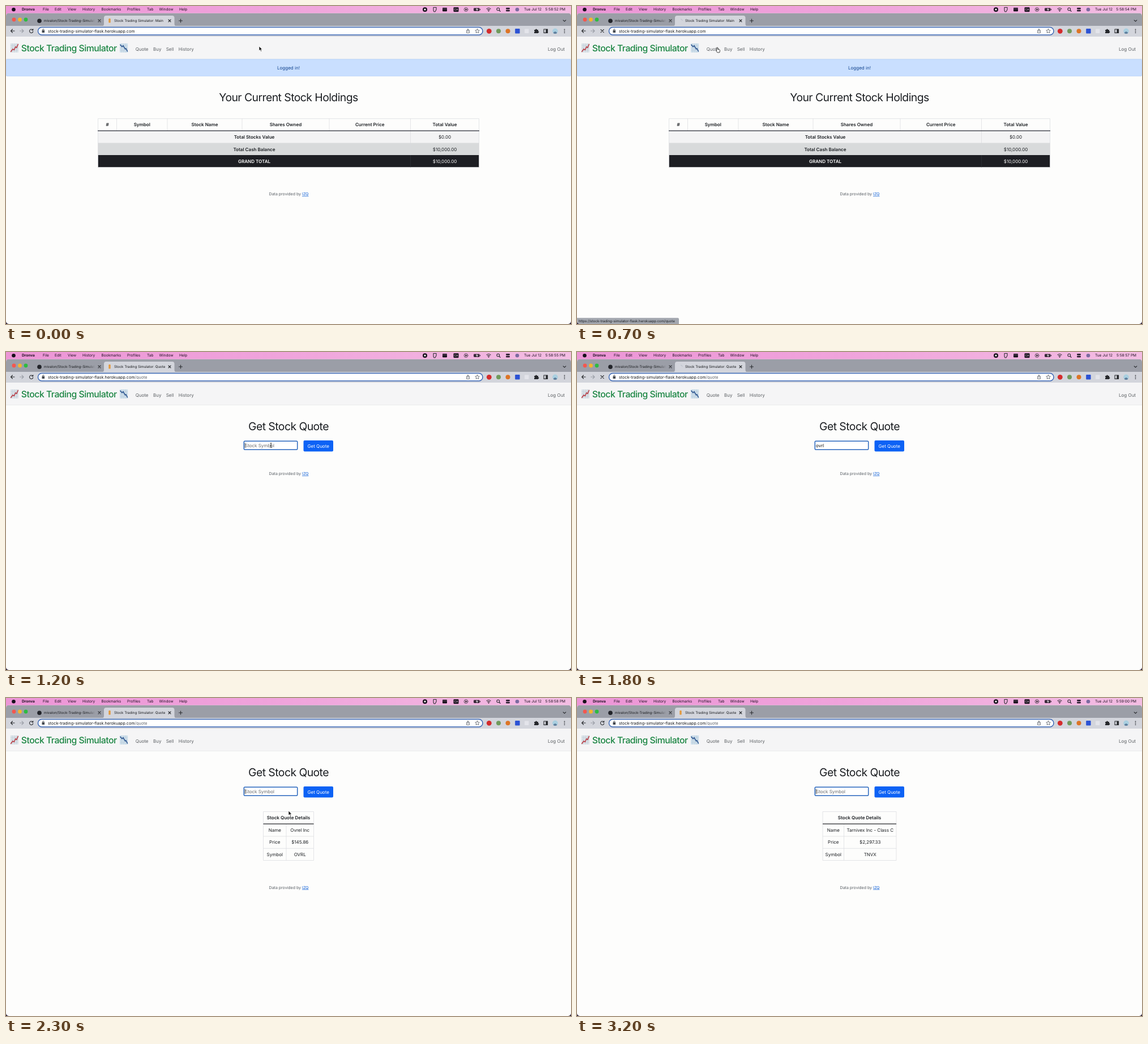
Recreate the animation shown at these times as an HTML page. Size 998x561 px, loop 3.3 s.

```html
<!DOCTYPE html>
<html lang="en">
<head>
<meta charset="utf-8">
<title>Stock Trading Simulator</title>
<style>
html, body { margin: 0; width: 100%; height: 100%; overflow: hidden; background: #21152f; }
svg { display: block; width: 998px; height: 561px; }
text { font: 8px Inter, "Liberation Sans", sans-serif; fill: #1b1e22; text-rendering: geometricPrecision; white-space: pre; }
.menu text { font-size: 6.55px; fill: #1d1020; }
.menu .app { font-weight: 700; }
.tab { font-size: 6.15px; fill: #16181b; }
.url { font-size: 7.17px; fill: #15171a; }
.brand { font-size: 15.8px; font-weight: 500; letter-spacing: -.5px; fill: #1a8542; }
.nav text { fill: #5c6064; }
.h { font-size: 19.4px; letter-spacing: -.56px; text-anchor: middle; }
.mid { text-anchor: middle; }
.b { font-weight: 600; font-size: 8.05px; }
.foot text { font-size: 7px; fill: #585e64; }
.foot .link { fill: #0d5fd8; text-decoration: underline; }
.line { fill: none; stroke: #2b2d31; stroke-width: 1.1; stroke-linecap: round; stroke-linejoin: round; }
.grid { fill: none; stroke: #d8dade; stroke-width: .7; }
</style>
</head>
<body>
<svg id="stage" viewBox="0 0 998 561">
  <defs>
    <linearGradient id="sky"><stop stop-color="#ec95d6"/><stop offset=".5" stop-color="#f0a4dc"/><stop offset="1" stop-color="#f3bde3"/></linearGradient>
    <linearGradient id="fade" gradientUnits="userSpaceOnUse" x1="144" x2="158"><stop stop-color="#16181b"/><stop offset="1" stop-color="#16181b" stop-opacity="0"/></linearGradient>
    <clipPath id="win"><rect y="12.6" width="998" height="548.4" rx="5"/></clipPath>
    <clipPath id="tabClip"><rect x="60" y="18" width="98" height="16"/></clipPath>
  </defs>

  <rect width="998" height="561" fill="#21152f"/>
  <rect width="998" height="17" fill="url(#sky)"/>
  <g class="menu" id="menu">
    <circle cx="13.5" cy="6.2" r="3.3" fill="#16101a"/>
    <text x="915" y="8.4">Tue Jul 12</text>
    <text id="clock" x="988" y="8.4" text-anchor="end"></text>
    <circle cx="740" cy="6.2" r="4" fill="#17111b"/><circle cx="740" cy="6.2" r="1.6" fill="#eee"/>
    <path class="line" d="M755 2.5h5v4l-2 3.5h-2l-1-2z"/>
    <rect x="771" y="3" width="8" height="6.4" rx=".8" fill="#17111b"/><path d="M771 5h8" stroke="#b78bb0" stroke-width=".6"/>
    <rect x="790.5" y="2.2" width="9" height="8" rx="1.2" fill="#17111b"/>
    <text x="795" y="8" class="mid" style="font-size:5px;fill:#f3d5ec">CA</text>
    <circle class="line" cx="812.5" cy="6.2" r="3.3" style="stroke-width:.8"/><path d="M811.5 4.4l3 1.8-3 1.8z"/>
    <rect x="826" y="3.4" width="10.5" height="5.6" rx="1.4" fill="#3a2a3a"/><path d="M832.4 3.2l-2.4 3.4h2l-.8 2.6 2.8-3.5h-2z" fill="#fff"/><path d="M837.6 5v2.4" stroke="#3a2a3a"/>
    <path class="line" d="M849 5q3.5-3 7 0M850.5 6.9q2-1.6 4 0"/><circle cx="852.5" cy="8.7" r=".9"/>
    <circle class="line" cx="869.3" cy="5.6" r="2.4"/><path class="line" d="M871.1 7.5l2 2"/>
    <rect x="883" y="3" width="7" height="2.8" rx="1.4" fill="#2b2030"/><rect x="883" y="6.8" width="7" height="2.8" rx="1.4" fill="#2b2030"/>
    <circle cx="903" cy="6.2" r="3.3" fill="#7c6aa0"/>
  </g>

  <g clip-path="url(#win)">
    <rect y="12.6" width="998" height="549" fill="#fdfdfc"/>
    <rect y="12.6" width="998" height="23" fill="#9b9ea7"/>
    <path d="M169 35.5q4 0 4-4V21q0-4 4-4h116.5q4 0 4 4v10.5q0 4 4 4z" fill="#d3d5dc"/>
    <rect y="35" width="998" height="19" fill="#d3d5dc"/>
    <circle cx="14" cy="24" r="3.4" fill="#f4574f"/><circle cx="24.5" cy="24" r="3.4" fill="#f5b52e"/><circle cx="35" cy="24" r="3.4" fill="#2dbb41"/>
    <circle cx="59" cy="26.2" r="3.8" fill="#22242a"/>
    <text class="tab" x="67" y="28.3" clip-path="url(#tabClip)" style="fill:url(#fade)">mivalon/Stock-Trading-Simulator</text>
    <path class="line" d="M163 24l4 4m0-4l-4 4M287 24l4 4m0-4l-4 4M305.5 26h6m-3-3v6M984.2 25l2.3 2.2 2.3-2.2"/>
    <rect id="favicon" x="181.3" y="22" width="3.4" height="7.6" rx="1.2" fill="#e39a3f"/>
    <path id="spinner" d="M183 23a3.2 3.2 0 0 1 3.2 3.2" fill="none" stroke="#b4bac6" stroke-width=".8"/>

    <text class="tab" id="tabTitle" x="191" y="28.3"></text>
    <path class="line" d="M15 44H8.5m3-3l-3 3 3 3"/>
    <path class="line" d="M24.5 44H31m-3-3l3 3-3 3" style="stroke:#999da6"/>
    <path class="line" id="reload" d="M47.4 42.5A3.2 3.2 0 1 0 47.8 45M47.8 40.5v2.3h-2.3"/>
    <path class="line" id="stop" d="M42 41.5l5.2 5.2m0-5.2l-5.2 5.2"/>
    <rect x="56.5" y="37.5" width="785.5" height="13.4" rx="6.7" fill="#fff" stroke="#3b67b5" stroke-width="1.5"/>
    <rect x="63.5" y="43" width="4.6" height="4" rx=".6" fill="#454a51"/><path class="line" d="M64.6 43v-1.1a1.2 1.2 0 0 1 2.4 0V43" style="stroke-width:.8"/>
    <text class="url" x="74" y="46.6">stock-trading-simulator-flask.herokuapp.com<tspan id="path" fill="#5f636a"></tspan></text>
    <path class="line" style="stroke-width:.8;stroke:#555a62" d="M815 43h-1.5v4.5h5V43H817M816 45.5v-5m-1.5 1.5l1.5-1.5 1.5 1.5M832.5 40.3l1.1 2.5 2.7.3-2 1.8.6 2.7-2.4-1.4-2.4 1.4.6-2.7-2-1.8 2.7-.3z"/>
    <circle cx="853.3" cy="44.3" r="4.4" fill="#d42b2c"/>
    <circle cx="870" cy="44.3" r="4" fill="#709b5c"/>
    <circle cx="886.5" cy="44.3" r="4" fill="#dd7526"/>
    <rect x="899.2" y="40" width="8.4" height="8.4" rx="1" fill="#2c52d4"/>
    <rect x="916" y="40.5" width="7.5" height="7.5" rx="1" fill="#e3e4ea"/>
    <path d="M933 42h2a1.5 1.5 0 0 1 3 0h2v2.4a1.4 1.4 0 0 1 0 2.8V48h-7v-2a1.3 1.3 0 0 0 0-2.4z" fill="#25272b"/>
    <rect class="line" x="950" y="41" width="6.6" height="6.4"/><rect x="953.5" y="41" width="3" height="6.4" fill="#25272b"/>
    <circle cx="970" cy="44.3" r="4.8" fill="#a9cfe0"/><path d="M966.5 47.5q3.5-5 7 0-3.5 3-7 0" fill="#5e7f9d"/>
    <g fill="#35383d"><circle cx="986.5" cy="41.5" r=".9"/><circle cx="986.5" cy="44.3" r=".9"/><circle cx="986.5" cy="47.1" r=".9"/></g>

    <rect y="54" width="998" height="39.5" fill="#f5f5f6"/>
    <path d="M0 93.5h998" stroke="#e6e7e9" stroke-width=".7"/>
    <g id="charts"></g>
    <text class="brand" x="26.8" y="80">Stock Trading Simulator</text>
    <g class="nav">
      <text x="228.7" y="78.7">Quote</text><text x="260" y="78.7">Buy</text><text x="282.7" y="78.7">Sell</text><text x="304.7" y="78.7">History</text>
      <text x="987" y="78.7" text-anchor="end">Log Out</text>
    </g>

    <g id="home">
      <rect x=".4" y="94" width="997.2" height="29.6" rx="1.5" fill="#c9dfff" stroke="#b3d0fa" stroke-width=".8"/>
      <text class="mid" x="499" y="111.6" style="fill:#13458f">Logged in!</text>
      <text class="h" x="499" y="168.3">Your Current Stock Holdings</text>
      <g id="holdings"></g>
    </g>

    <g id="quote">
      <text class="h" x="499" y="138.3">Get Stock Quote</text>
      <rect x="420.3" y="157.2" width="94.4" height="15" rx="1.5" fill="#fff" stroke="#2866bd" stroke-width="1.5"/>
      <text id="field" x="422" y="167.5"></text>
      <path id="caret" d="M422.3 160.3v9" stroke="#222" stroke-width=".8"/>
      <rect x="525.5" y="156" width="52.5" height="19.5" rx="2" fill="#0d62f5"/>
      <text class="mid" x="551.7" y="168.7" style="fill:#fff">Get Quote</text>
    </g>
    <g id="details"></g>

    <g class="foot" id="foot"><text x="521" text-anchor="end">Data provided by</text><text class="link" x="523">IZQ</text></g>

    <g id="status">
      <path d="M0 550.3h178q2 0 2 2V561H0z" fill="#a3a7af"/>
      <text x="2.7" y="558" style="font-size:6.1px">https://stock-trading-simulator-flask.herokuapp.com/quote</text>
    </g>
  </g>

  <g id="pointer">
    <path id="arrow" d="M0 0v8l1.9-1.7 1.3 2.9 1.4-.6-1.3-2.8h2.5z" fill="#111" stroke="#fff" stroke-width=".7"/>
    <path id="hand" d="M-1.2-3.5q1.1-1 1.9 0v2.8l3 .7q1 .4.8 1.6l-.7 3.4h-4L-2.6 1.8q-.2-1.2 1.4-.3z" fill="#fff" stroke="#111" stroke-width=".8"/>
    <path id="beam" d="M-1.5-4q1.5 0 1.5 1v6q0 1-1.5 1M1.5-4Q0-4 0-3M0 3q0 1 1.5 1M-1 0h2" fill="none" stroke="#222" stroke-width=".9"/>
  </g>
</svg>
<script>
const $ = id => document.getElementById(id);
const show = (id, on) => $(id).setAttribute('visibility', on ? 'visible' : 'hidden');
const label = (x, y, s, cls = '', fill = '#1b1e22') => `<text class="mid ${cls}" x="${x}" y="${y}" style="fill:${fill}">${s}</text>`;
const box = (x, y, w, h, fill) => `<rect x="${x}" y="${y}" width="${w}" height="${h}" fill="${fill}"/>`;

const menus = { Dronva: 28, File: 65, Edit: 86, View: 109, History: 135, Bookmarks: 168.5, Profiles: 214, Tab: 249, Window: 270.5, Help: 306 };
$('menu').insertAdjacentHTML('beforeend', Object.entries(menus).map(([name, x], i) =>
  `<text x="${x}" y="8.4" class="${i ? '' : 'app'}">${name}</text>`).join(''));

const chart = (x, paper, ink, line) => `<g transform="translate(${x} 66)">${box(0, 0, 14.2, 16, paper)}
  <path d="M0 4h14.2M0 8h14.2M0 12h14.2M3.5 0v16M7 0v16M10.5 0v16" stroke="#a9bccb" stroke-width=".4"/>
  <path d="${line}" fill="none" stroke="${ink}" stroke-width="1.5"/></g>`;
$('charts').innerHTML = chart(7.8, '#dde3e8', '#b83a42', 'M.5 15L4 10l2.5 1.5L9 6l2 1.5L13.7 1')
  + chart(201, '#cfe0ec', '#27508c', 'M.5 2l3.5 4 2-2 3.5 6 1.5-1 2.7 5.5');

const columns = [162.5, 195.5, 285, 417, 571, 714.5, 835.5];
const headings = ['#', 'Symbol', 'Stock Name', 'Shares Owned', 'Current Price', 'Total Value'];
const totals = [
  ['Total Stocks Value', '$0.00', '#f3f3f4', '#1b1e22'],
  ['Total Cash Balance', '$10,000.00', '#d8dadb', '#1b1e22'],
  ['GRAND TOTAL', '$10,000.00', '#1d1e23', '#fff']
];
$('holdings').innerHTML = totals.map(([name, value, bg, ink], i) => {
  const y = 220 + i * 21.5;
  return box(162.5, y, 673, 21.5, bg) + label(438.5, y + 14, name, 'b', ink) + label(775, y + 14, value, '', ink);
}).join('')
  + headings.map((s, i) => label((columns[i] + columns[i + 1]) / 2, 212.3, s, 'b')).join('')
  + `<path class="grid" d="M162.5 198.7h673v85.8h-673zM714.5 220v43${columns.slice(1, -1).map(x => `M${x} 198.7V220`).join('')}"/>
     <path d="M714.5 263v21.5" stroke="#34363b" stroke-width=".6"/><path d="M162 220.2h674" stroke="#282b36" stroke-width="1.3"/>`;

function detailsTable(left, split, name, price, symbol) {
  const right = 998 - left, rows = [['Name', name], ['Price', price], ['Symbol', symbol]];
  return `<path class="grid" d="M${left} 200.5H${right}V286.5H${left}zM${left} 244H${right}M${left} 265.3H${right}M${split} 222V286.5"/>
    <path d="M${left} 222.2H${right}" stroke="#24262a" stroke-width="1.2"/>`
    + label(499, 214.3, 'Stock Quote Details', 'b')
    + rows.map((row, i) => row.map((s, j) => label(j ? (split + right) / 2 : (left + split) / 2, 236 + i * 21.3, s)).join('')).join('');
}
const results = {
  first: detailsTable(454.5, 495, 'Ovrel Inc', '$145.86', 'OVRL'),
  second: detailsTable(434, 471.5, 'Tarnivex Inc - Class C', '$2,297.33', 'TNVX')
};

// Pointer stops: time, x, y
const stops = [[0, 447, 71], [100, 444, 71], [500, 248, 77], [700, 248, 77], [800, 407, 202], [1100, 468, 164.5], [1900, 468, 164.5], [2300, 499, 199], [3300, 499, 199]];
function pointerAt(t) {
  const i = stops.findIndex((s, k) => t >= s[0] && t < stops[k + 1][0]);
  const [a, b] = [stops[i], stops[i + 1]], u = (t - a[0]) / (b[0] - a[0]);
  return [a[1] + (b[1] - a[1]) * u, a[2] + (b[2] - a[2]) * u];
}
const within = (t, from, to) => t >= from && t < to;
const typed = (t, start, word) => word.slice(0, Math.floor((t - start) / 100) + 1);

let shownResult;
function render(t) {
  const onHome = t < 800;
  const loading = within(t, 700, 800) || within(t, 1800, 1900) || within(t, 2900, 3100);
  const result = t >= 3100 ? 'second' : t >= 1900 ? 'first' : '';
  const word = within(t, 1400, 1900) ? typed(t, 1400, 'ovrl') : within(t, 2500, 3100) ? typed(t, 2500, 'tnvx') : '';

  const seconds = Math.floor(52.6 + t / 400);
  $('clock').textContent = `5:${58 + Math.floor(seconds / 60)}:${String(seconds % 60).padStart(2, '0')} PM`;
  $('tabTitle').textContent = 'Stock Trading Simulator: ' + (onHome ? 'Main' : 'Quote');
  $('path').textContent = onHome ? '' : '/quote';

  show('home', onHome);
  show('quote', !onHome);
  show('favicon', !loading);
  show('spinner', loading);
  show('reload', !loading);
  show('stop', loading);
  show('status', within(t, 500, 1000));
  if (result !== shownResult) $('details').innerHTML = results[shownResult = result] || '';
  $('foot').setAttribute('transform', `translate(0 ${onHome ? 334.4 : result ? 336.6 : 217})`);

  $('field').textContent = word || 'Stock Symbol';
  $('field').style.fill = word ? '#111' : '#696b6e';
  const pageStart = t >= 3100 ? 3100 : t >= 1900 ? 1900 : 800;
  const blinkOn = Math.floor((t - pageStart) / 200) % 2 === 0;
  show('caret', !onHome && !word && blinkOn);

  const [x, y] = pointerAt(t);
  const hidden = within(t, 1400, 2000) || t >= 2500;
  const shape = within(t, 500, 800) ? 'hand' : within(t, 1100, 2100) ? 'beam' : 'arrow';
  for (const id of ['arrow', 'hand', 'beam']) show(id, !hidden && id === shape);
  $('pointer').setAttribute('transform', `translate(${x} ${y})`);
}

const start = performance.now();
function tick() {
  const elapsed = Math.max(0, performance.now() - start) % 3300;
  render(Math.floor(elapsed / 100) * 100);
  requestAnimationFrame(tick);
}
tick();
</script>
</body>
</html>
```
